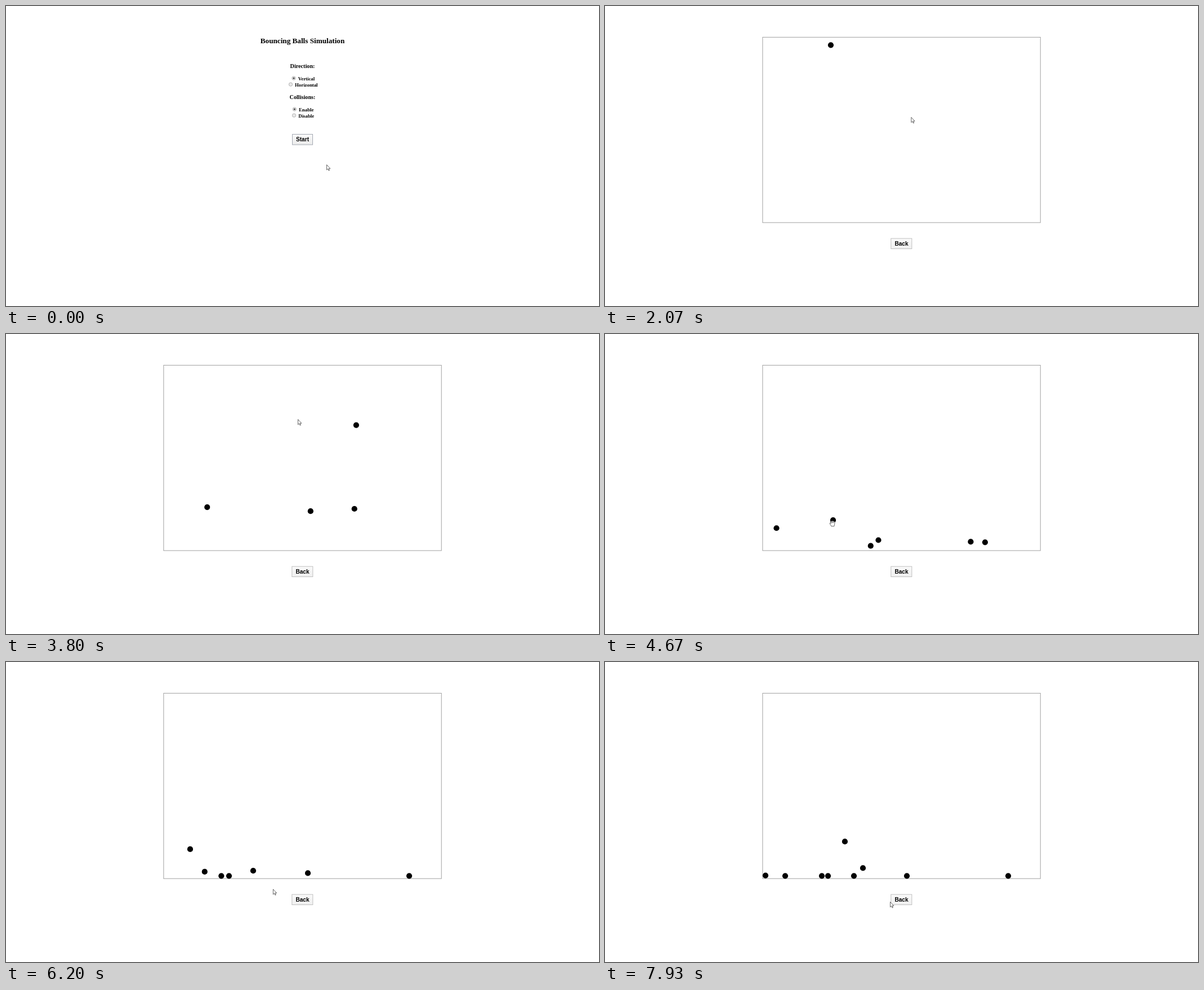
These frames come from a looping animation (1053x532 px, 8 s). An HTML page with a canvas:

```html
<!DOCTYPE html>
<html lang="en">
<head>
<meta charset="utf-8">
<title>Bouncing Balls Simulation</title>
<style>
  html, body { margin: 0; width: 100%; height: 100%; overflow: hidden; background: #fff; }
  canvas { display: block; }
</style>
</head>
<body>
<canvas id="stage" width="1053" height="532"></canvas>
<script>
const ctx = document.getElementById('stage').getContext('2d', { alpha: false });
const LOOP = 8000, STEP = 1000 / 15, PAGE_CHANGE = 660;
const GRAVITY = 700, FLOOR_BOUNCE = 0.6, CEILING_BOUNCE = 0.67, PULL = 0.11;
const LEFT = 285, RIGHT = 768, CEILING = 60, FLOOR = 379.3, RADIUS = 5.1;
const SERIF = '"Liberation Serif", serif', SANS = '"Liberation Sans", sans-serif';

// Each throw: grabbed at press and let go at release (ms) from x, y with vertical
// speed vy; it covers travel pixels sideways, braking evenly for roll seconds.
const throws = [
  { press: 1270, release: 1710, x: 503, y: 252, vy: -637, travel: -649, roll: 4.35 },
  { press: 2200, release: 2480, x: 545, y: 169, vy: 46, travel: 595, roll: 3.4 },
  { press: 2600, release: 2870, x: 494, y: 261, vy: -276, travel: -309, roll: 3.67 },
  { press: 3200, release: 3600, x: 550, y: 182, vy: -172, travel: 450, roll: 2.4 },
  { press: 3950, release: 4130, x: 556, y: 196, vy: 200, travel: -236, roll: 3.3 },
  { press: 4600, release: 4875, x: 405, y: 330, vy: -215, travel: 37, roll: 1.86 },
  { press: 5050, release: 5250, x: 385, y: 263, vy: -260, travel: -100, roll: 2.7 },
  { press: 6560, release: 6720, x: 462, y: 285, vy: 137, travel: -4, roll: 1 },
  { press: 7270, release: 7500, x: 432, y: 280, vy: -63, travel: -15, roll: 1.9 },
];

// Pulling the pointer back sets the launch, so every throw adds its own stops.
const route = [
  [0, 569, 281], [130, 581, 289], [400, 526, 236], [670, 526, 236], [870, 502, 249], [1200, 502, 249],
  [3800, 518, 151], [5530, 554, 246], [6300, 470, 410], [7000, 454, 325], [7800, 536, 431], [7930, 506, 425],
];
for (const { press, release, x, y, vy, travel, roll } of throws) {
  const pulled = [x - PULL * 2 * travel / roll, y - PULL * vy];
  route.push([press, x, y], [press + 0.74 * (release - press), ...pulled], [release, ...pulled]);
}
route.sort((a, b) => a[0] - b[0]);

function pointerAt(time) {
  const next = route.findIndex(stop => stop[0] > time);
  if (next < 1) return { x: route.at(-1)[1], y: route.at(-1)[2] };
  const [t0, x0, y0] = route[next - 1], [t1, x1, y1] = route[next];
  const u = (time - t0) / (t1 - t0), eased = u * u * (3 - 2 * u);
  return { x: x0 + (x1 - x0) * eased, y: y0 + (y1 - y0) * eased };
}

function ballX({ x, travel, roll }, seconds) {
  const remaining = 1 - Math.min(seconds / roll, 1);
  const unfolded = x + travel * (1 - remaining ** 2);
  if (unfolded < LEFT) return 2 * LEFT - unfolded;
  return unfolded > RIGHT ? 2 * RIGHT - unfolded : unfolded;
}

function ballY({ y, vy }, seconds) {
  while (y < FLOOR || Math.abs(vy) > 15) {
    const ceilingSpeed = Math.sqrt(Math.max(0, vy * vy - 2 * GRAVITY * (y - CEILING)));
    const hitsCeiling = vy < 0 && ceilingSpeed > 0;
    const floorSpeed = Math.sqrt(vy * vy + 2 * GRAVITY * (FLOOR - y));
    const flight = ((hitsCeiling ? -ceilingSpeed : floorSpeed) - vy) / GRAVITY;
    if (seconds < flight) return y + vy * seconds + GRAVITY / 2 * seconds ** 2;
    seconds -= flight;
    y = hitsCeiling ? CEILING : FLOOR;
    vy = hitsCeiling ? ceilingSpeed * CEILING_BOUNCE : -floorSpeed * FLOOR_BOUNCE;
  }
  return FLOOR;
}

function text(label, x, baseline, size, align = 'center', family = SERIF) {
  ctx.font = `bold ${size}px ${family}`;
  ctx.textAlign = align;
  ctx.fillStyle = '#000';
  ctx.fillText(label, x, baseline);
}

function disc(x, y, radius, color) {
  ctx.beginPath();
  ctx.arc(x, y, radius, 0, 2 * Math.PI);
  ctx.fillStyle = color;
  ctx.fill();
}

function button(label, x, y, w, h, border, shade, baseline) {
  const fill = ctx.createLinearGradient(0, y, 0, y + h);
  fill.addColorStop(0, '#fafafa');
  fill.addColorStop(1, shade);
  ctx.fillStyle = fill;
  ctx.fillRect(x, y, w, h);
  ctx.strokeStyle = border;
  ctx.lineWidth = 1;
  ctx.strokeRect(x, y, w, h);
  text(label, 526.5, baseline, 10.1, 'center', SANS);
}

function radio(label, x, y, labelX, checked) {
  disc(x, y, 3.2, '#e8e8e8');
  ctx.strokeStyle = '#a8a8a8';
  ctx.lineWidth = 0.8;
  ctx.stroke();
  if (checked) disc(x, y, 1.6, '#444');
  text(label, labelX, y + 4, 8.8, 'left');
}

function drawMenu(time) {
  text('Bouncing Balls Simulation', 526.5, 66, 13.2);
  text('Direction:', 526.5, 110.3, 10.2);
  radio('Vertical', 511, 128, 518.7, true);
  radio('Horizontal', 505.5, 139, 513, false);
  text('Collisions:', 526.5, 164.5, 10.2);
  radio('Enable', 512.3, 183, 520, true);
  radio('Disable', 511.5, 194, 519.3, false);
  const hover = time > 320;
  button('Start', 508.5, 227.5, 36, 18.5, hover ? '#777d88' : '#a3a8b2', time >= 600 ? '#ddd' : '#ececec', 240);
}

function drawBall(ball, time, pointer) {
  if (time < ball.press) return;
  const seconds = Math.max(0, time - ball.release) / 1000;
  const x = ballX(ball, seconds), y = ballY(ball, seconds);
  if (time < ball.release) {
    ctx.beginPath();
    ctx.moveTo(x, y);
    ctx.lineTo(x - 0.27 * (pointer.x - x), y - 0.27 * (pointer.y - y));
    ctx.strokeStyle = '#000';
    ctx.lineWidth = 0.8;
    ctx.stroke();
  }
  disc(x, y, RADIUS, '#000');
}

const arrow = new Path2D('M.5 .5V9.7L2.6 7.8 4.1 11 5.4 10.4 4 7.3H6.8Z');
const hand = new Path2D('M-2 5C-2.5 3-5 1-4.8-.3-4.5-1.3-3.3-.7-2.7 .2L-3.7-3C-3.6-4.4-2.3-4.3-2-3.2-2-5.2-.2-5.3 0-3.8 .3-5.3 2-5 2-3.3 2.6-4.2 4-3.7 3.9-2.3 4.2 1 3.4 2.2 3 5ZM-2-3.2L-1.4-.8M0-3.8V-.8M2-3.3L1.6-.8');

function drawPointer({ x, y }, grabbing) {
  const shape = grabbing ? hand : arrow;
  ctx.save();
  ctx.translate(x, y);
  ctx.fillStyle = '#fff';
  ctx.fill(shape);
  ctx.strokeStyle = '#333';
  ctx.lineWidth = 0.75;
  ctx.stroke(shape);
  ctx.restore();
}

function draw(now) {
  const time = Math.floor((now % LOOP + 4) / STEP) * STEP % LOOP;
  const pointer = pointerAt(time);
  ctx.fillStyle = '#fff';
  ctx.fillRect(0, 0, 1053, 532);
  if (time < PAGE_CHANGE) {
    drawMenu(time);
  } else {
    ctx.strokeStyle = '#a0a0a0';
    ctx.lineWidth = 1;
    ctx.strokeRect(279.9, 55.4, 493.3, 328.7);
    button('Back', 507.8, 412.2, 37, 18.3, '#c0c0c0', '#efefef', 424.5);
    for (const ball of throws) drawBall(ball, time, pointer);
  }
  drawPointer(pointer, throws.some(({ press, release }) => time >= press && time < release));
  requestAnimationFrame(draw);
}
requestAnimationFrame(draw);
</script>
</body>
</html>
```
